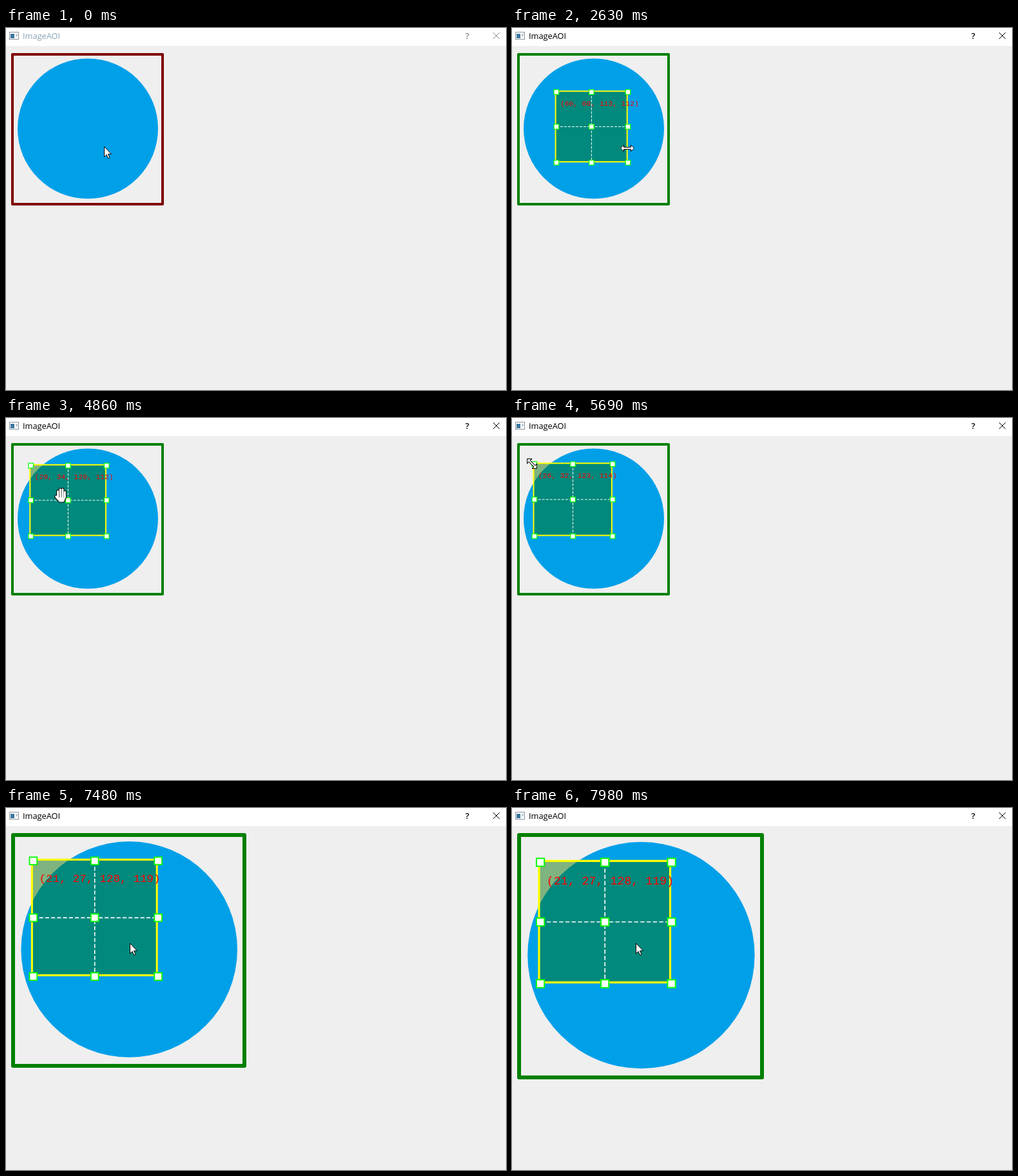
Write an HTML page with a canvas that moves like this. It is 776 px wide and 563 px high and loops after 8000 ms.

```html
<!DOCTYPE html>
<html>
<head>
<meta charset="utf-8">
<style>
html, body { margin: 0; width: 776px; height: 563px; overflow: hidden; background: #efefef; }
canvas { display: block; }
</style>
</head>
<body>
<canvas id="stage" width="776" height="563"></canvas>
<script>
const ctx = document.getElementById('stage').getContext('2d');
const LOOP = 8000, STEP = 70, ACTIVE_AT = 270, AREA_AT = 560;

// Each gesture moves the pointer to a point; "drag" names the area edges it takes along
const GESTURES = [
  { from: 0, to: 50, x: 135, y: 179 },
  { from: 270, to: 840, x: 133, y: 172 },
  { from: 1090, to: 1280, x: 189, y: 236 },
  { from: 1400, to: 1610, x: 184, y: 214 },
  { from: 1720, to: 1930, x: 212, y: 261, shape: 'nwse', drag: 'RB' },
  { from: 2040, to: 2400, x: 181, y: 209, shape: 'nwse', drag: 'RB' },
  { from: 2400, to: 2630, x: 179, y: 187, shape: 'ew' },
  { from: 2700, to: 2890, x: 175, y: 155, shape: 'ew' },
  { from: 3140, to: 3450, x: 210, y: 155, shape: 'ew', drag: 'R' },
  { from: 3450, to: 3980, x: 181.5, y: 155, shape: 'ew', drag: 'R' },
  { from: 4030, to: 4170, x: 115, y: 145, shape: 'hand' },
  { from: 4280, to: 4680, x: 84.7, y: 119.5, shape: 'hand', drag: 'LTRB' },
  { from: 4900, to: 5560, x: 35, y: 73 },
  { from: 5620, to: 5880, x: 21, y: 64, shape: 'nwse', drag: 'LT' },
  { from: 6060, to: 6130, x: 26.7, y: 66, shape: 'nwse', drag: 'LT' },
  { from: 6240, to: 6520, x: 201, y: 219 },
  { from: 6520, to: 6800, x: 236, y: 273 },
  { from: 6870, to: 7080, x: 192, y: 210 }
];

function progress(t, from, to) {
  if (t >= to) return 1;
  return Math.max(0, Math.floor((t - from) / STEP) * STEP / (to - from));
}

function sceneAt(t) {
  const pointer = { x: 152, y: 184, shape: 'arrow' };
  const area = { L: 68.9, T: 99.6, R: 183, B: 214.4 };
  for (const { from, to, x, y, shape = 'arrow', drag = '' } of GESTURES) {
    if (t < from) break;
    const k = progress(t, from, to);
    const dx = (x - pointer.x) * k, dy = (y - pointer.y) * k;
    pointer.x += dx;
    pointer.y += dy;
    pointer.shape = shape;
    for (const edge of drag) area[edge] += 'LR'.includes(edge) ? dx : dy;
  }
  const notches = Math.round(13 * progress(t, 7080, 7730) - 5 * progress(t, 7840, 7980));
  return { pointer, area, scale: 1 + .0771 * notches };
}

function strokeLine(x1, y1, x2, y2) {
  ctx.beginPath();
  ctx.moveTo(x1, y1);
  ctx.lineTo(x2, y2);
  ctx.stroke();
}

function drawTitleBar(active) {
  ctx.fillStyle = '#fff';
  ctx.fillRect(0, 0, 776, 28);
  ctx.strokeStyle = '#8a9299';
  ctx.lineWidth = 1;
  ctx.strokeRect(5.5, 6.5, 14, 11);
  ctx.fillStyle = '#3c78a0';
  ctx.fillRect(7, 9, 6, 7);
  ctx.fillStyle = '#c4ccd2';
  ctx.fillRect(15, 9, 3, 4);
  ctx.font = '12.8px "Open Sans", sans-serif';
  ctx.fillStyle = active ? '#000' : '#8aa5b8';
  ctx.fillText('ImageAOI', 26, 17);
  ctx.font = '600 12.8px "Open Sans", sans-serif';
  ctx.fillStyle = ctx.strokeStyle = active ? '#000' : '#888';
  ctx.fillText('?', 713, 17);
  strokeLine(756, 7, 766, 17);
  strokeLine(766, 7, 756, 17);
}

function drawPicture() {
  ctx.fillStyle = '#00a0e9';
  ctx.beginPath();
  ctx.arc(119, 117.5, 109, 0, Math.PI * 2);
  ctx.fill();
}

// Drawn unscaled on whole pixels so that the edges stay crisp
function drawBorder(active, scale) {
  const size = Math.round(237 * scale), width = Math.round(4 * scale);
  ctx.strokeStyle = active ? '#008000' : '#800000';
  ctx.lineWidth = width;
  ctx.lineJoin = 'round';
  ctx.strokeRect(8 + width / 2, 39 + width / 2, size - width, size - width);
  ctx.lineJoin = 'miter';
}

function drawArea({ L, T, R, B }) {
  const box = [L - 1.3, T - 1.3, R - L, B - T];
  const cx = (L + R) / 2 - 1, cy = (T + B) / 2 - 1;
  ctx.fillStyle = 'rgba(0,111,0,.47)';
  ctx.fillRect(...box);
  ctx.strokeStyle = '#ff0';
  ctx.lineWidth = 2;
  ctx.strokeRect(...box);

  const label = [L - 9.3, T - 40, R - L + 2.1, B - T + 2.1].map(Math.round).join(', ');
  ctx.fillStyle = '#f00';
  ctx.font = '11.3px "Liberation Mono", monospace';
  ctx.fillText(`(${label})`, L + 6, T + 21.2);

  ctx.strokeStyle = '#fff';
  ctx.lineWidth = 1;
  ctx.setLineDash([4, 2]);
  strokeLine(L, cy, R, cy);
  strokeLine(cx, T, cx, B);
  ctx.setLineDash([]);

  ctx.fillStyle = '#fff';
  ctx.strokeStyle = '#0f0';
  ctx.lineWidth = 1.2;
  for (const x of [L, cx, R]) for (const y of [T, cy, B]) {
    ctx.fillRect(x - 3.8, y - 3.8, 7.6, 7.6);
    ctx.strokeRect(x - 3.8, y - 3.8, 7.6, 7.6);
  }
}

const ARROW = new Path2D('M.5 .5V16.5L4 13L6.7 18.8L9 17.8L6.5 12H11.5Z');
const DOUBLE = new Path2D('M-10.5 0L-5.5 -5V-1.5H5.5V-5L10.5 0L5.5 5V1.5H-5.5V5Z');
const HAND = new Path2D('M-4.5 4V-6M-.8 3V-9M2.9 3V-9M6.3 4V-5M-4.5 6L-7.3 2M-3 5H5L4 9H-2Z');

function drawPointer({ x, y, shape }) {
  ctx.save();
  ctx.translate(Math.round(x), Math.round(y));
  ctx.fillStyle = '#fff';
  ctx.strokeStyle = '#000';
  ctx.lineWidth = 1;
  if (shape === 'hand') {
    ctx.lineCap = ctx.lineJoin = 'round';
    for (const [color, width] of [['#000', 5], ['#fff', 3]]) {
      ctx.strokeStyle = color;
      ctx.lineWidth = width;
      ctx.stroke(HAND);
    }
    ctx.fill(HAND);
  } else {
    const path = shape === 'arrow' ? ARROW : DOUBLE;
    if (shape === 'nwse') ctx.rotate(Math.PI / 4);
    ctx.fill(path);
    ctx.stroke(path);
  }
  ctx.restore();
}

function draw(now) {
  const t = now % LOOP, active = t >= ACTIVE_AT;
  const { pointer, area, scale } = sceneAt(t);
  ctx.fillStyle = '#efefef';
  ctx.fillRect(0, 0, 776, 563);
  drawTitleBar(active);
  drawBorder(active, scale);
  ctx.save();
  ctx.translate(8, 39);
  ctx.scale(scale, scale);
  drawPicture();
  ctx.translate(-8, -39);
  if (t >= AREA_AT) drawArea(area);
  ctx.restore();
  drawPointer(pointer);
}

const start = performance.now();
function loop() {
  draw(performance.now() - start);
  requestAnimationFrame(loop);
}
loop();
</script>
</body>
</html>
```
